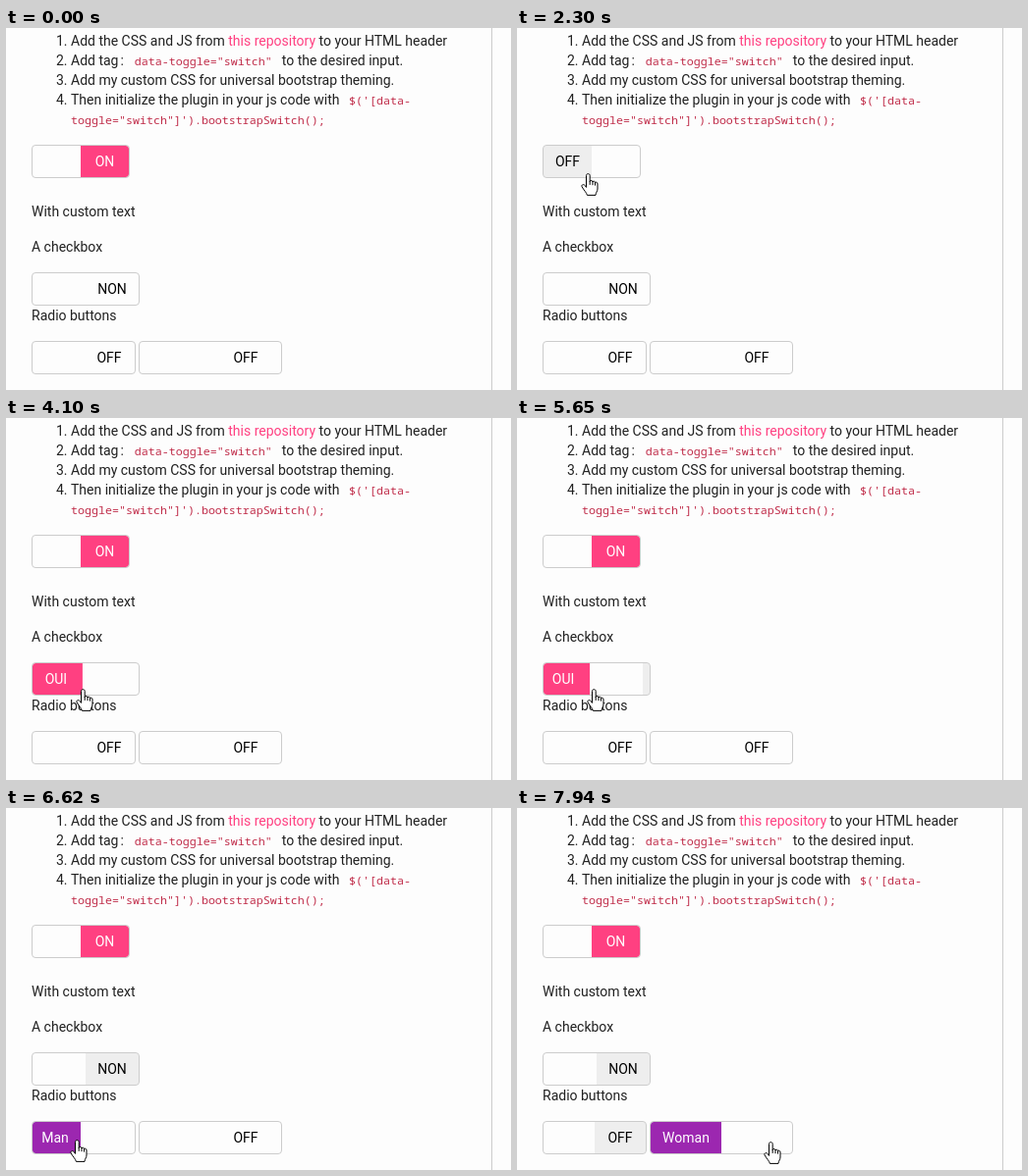
These frames come from a looping animation (514x369 px, 8 s). An HTML page:

```html
<!DOCTYPE html>
<html lang="en">
<head>
<meta charset="utf-8">
<title>Switch demo</title>
<style>
  html, body { margin: 0; width: 100%; height: 100%; overflow: hidden; background: #fdfdfd; }
  svg { display: block; }
  text { font: 14px Roboto, sans-serif; fill: #212121; }
  .link { fill: #ff4081; }
  .code { font: 11.67px "Noto Sans Mono", "Liberation Mono", monospace; fill: #c02d4a; }
  .handle { text-anchor: middle; }
  .frame { fill: none; stroke: #ccc; }
  #cursor path { stroke: #000; stroke-linejoin: round; stroke-linecap: round; fill: #fff; }
</style>
</head>
<body>
<svg width="514" height="369" viewBox="0 0 514 369">
  <rect width="514" height="369" fill="#fdfdfd"/>
  <path d="M494.5 0V369" stroke="#ccc"/>

  <text x="51" y="18">1.</text>
  <text x="66" y="18">Add the CSS and JS from <tspan class="link">this repository</tspan> to your HTML header</text>
  <text x="51" y="38">2.</text>
  <text x="66" y="38">Add tag<tspan dx="2">:</tspan><tspan class="code" dx="11">data-toggle="switch"</tspan><tspan dx="10">to the desired input.</tspan></text>
  <text x="51" y="58">3.</text>
  <text x="66" y="58">Add my custom CSS for universal bootstrap theming.</text>
  <text x="51" y="78">4.</text>
  <text x="66" y="78">Then initialize the plugin in your js code with<tspan class="code" dx="9.6">$('[data-</tspan></text>
  <text x="66" y="98" class="code">toggle="switch"]').bootstrapSwitch();</text>
  <text x="26" y="192">With custom text</text>
  <text x="26" y="228">A checkbox</text>
  <text x="26" y="298">Radio buttons</text>

  <g id="switches"></g>

  <g id="cursor">
    <path id="arrow" d="M0 0V16L3.7 12.5L6.2 18.3L8.6 17.2L6.1 11.6H11.2Z"/>
    <g id="hand">
      <path d="M-2.5 14V2.5C-2.5 0 1.2 0 1.2 2.5V8.5C1.2 7 4 7 4 9C4.2 7.6 6.5 7.8 6.5 9.8C6.7 8.7 9 8.9 9 11V16C9 18.5 7.2 19.5 7 22.4H-1.6C-2 20 -5.3 17 -7 13.6C-7.6 11.8 -5.3 10.8 -4.1 12.2Z"/>
      <path d="M1.2 8.5V11.5M4 9V11.8M6.5 10V12.2"/>
    </g>
  </g>
</svg>
<script>
const LOOP = 8000, FRAME = 73;   // the screen refreshes once per FRAME
const SLIDE = 500, LEAD = 60, SETTLE = 440;
const BG = '#fdfdfd', GREY = '#eee', PINK = '#ff4081', PURPLE = '#9c27b0';
const $ = id => document.getElementById(id);

function add(parent, tag, attrs, text) {
  const el = document.createElementNS('http://www.w3.org/2000/svg', tag);
  for (const key in attrs) el.setAttribute(key, attrs[key]);
  if (text) el.textContent = text;
  parent.appendChild(el);
  return el;
}

// x, y: inner corner; w: handle width; flips: times at which the state changes
const switches = [
  { x: 27, y: 120, w: 49, on: 'ON', off: 'OFF', color: PINK, inverse: true, flips: [1020, 2320] },
  { x: 27, y: 250, w: 54, on: 'OUI', off: 'NON', color: PINK, flips: [3800, 5650] },
  { x: 27, y: 320, w: 52, on: 'Man', off: 'OFF', color: PURPLE, flips: [6320, 7500] },
  { x: 136, y: 320, w: 72, on: 'Woman', off: 'OFF', color: PURPLE, flips: [7500] }
];

switches.forEach((s, i) => {
  const { x, y, w } = s, root = $('switches');
  const clip = add(root, 'clipPath', { id: 'clip' + i });
  add(clip, 'rect', { x, y, width: 2 * w, height: 32, rx: 3 });
  s.strip = add(add(root, 'g', { 'clip-path': `url(#clip${i})` }), 'g', {});
  const handle = (slot, text, fill, ink) => {
    const left = x + slot * w;
    const back = add(s.strip, 'rect', { x: left, y, width: w, height: 32, fill });
    add(s.strip, 'text', { x: left + w / 2, y: y + 21, class: 'handle', style: 'fill:' + ink }, text);
    return back;
  };
  handle(s.inverse ? 2 : 0, s.on, s.color, '#fff');
  s.offBack = handle(s.inverse ? 0 : 2, s.off, GREY, '#000');
  add(root, 'rect', { x: x - .5, y: y - .5, width: 2 * w + 1, height: 33, rx: 3.5, class: 'frame' });
});

const snap = ms => Math.floor(ms / FRAME) * FRAME;

// CSS "ease": cubic-bezier(.25, .1, .25, 1)
function ease(x) {
  const curve = (u, a, b) => 3 * u * (1 - u) ** 2 * a + 3 * u * u * (1 - u) * b + u ** 3;
  let lo = 0, hi = 1;
  for (let i = 0; i < 20; i++) {
    const mid = (lo + hi) / 2;
    if (curve(mid, .25, .25) < x) lo = mid; else hi = mid;
  }
  return curve(lo, .1, 1);
}

function drawSwitch(s, t) {
  let on = s.inverse ? 1 : 0;
  for (const flip of s.flips) {
    if (t < flip) break;
    const k = t >= flip + SETTLE ? 1 : ease((snap(t - flip) + LEAD) / SLIDE);
    on += (1 - 2 * on) * k;
  }
  const shift = -s.w * (s.inverse ? on : 1 - on);
  s.strip.setAttribute('transform', `translate(${shift.toFixed(2)})`);
  // the off colour appears once the switch has been used
  const used = s.inverse || t >= s.flips[0] + SETTLE;
  s.offBack.setAttribute('fill', used ? GREY : BG);
}

// Pointer moves; px, py: ease-out powers, bow: sideways bulge
const enter = { at: 130, x: 343, y: 347 };
const moves = [
  { at: 130, end: 600, x: 73, y: 148, px: 2, py: 3 },
  { at: 2990, end: 3350, x: 86, y: 281, bow: 24 },
  { at: 3350, end: 3510, x: 79, y: 276 },
  { at: 5790, end: 6090, x: 73, y: 338 },
  { at: 6900, end: 7120, x: 264, y: 344 },
  { at: 7360, end: 7500, x: 259, y: 340 }
];

function pointer(t) {
  let { x, y } = enter;
  for (const m of moves) {
    if (t < m.at) break;
    const k = t >= m.end ? 1 : snap(t - m.at) / (m.end - m.at);
    const out = power => 1 - (1 - k) ** power;
    x += (m.x - x) * out(m.px || 1) + (m.bow || 0) * Math.sin(Math.PI * k);
    y += (m.y - y) * out(m.py || 1);
  }
  return [Math.round(x), Math.round(y)];
}

const show = (id, on) => $(id).setAttribute('visibility', on ? 'visible' : 'hidden');

function draw(t) {
  for (const s of switches) drawSwitch(s, t);
  const [x, y] = pointer(t), visible = t >= enter.at;
  const over = switches.some(s =>
    x >= s.x - 1 && x <= s.x + 2 * s.w + 1 && y >= s.y - 1 && y <= s.y + 33);
  $('cursor').setAttribute('transform', `translate(${x} ${y})`);
  show('hand', visible && over);
  show('arrow', visible && !over);
}

const began = performance.now();
function tick() {
  draw((performance.now() - began) % LOOP);
  requestAnimationFrame(tick);
}
tick();
</script>
</body>
</html>
```
